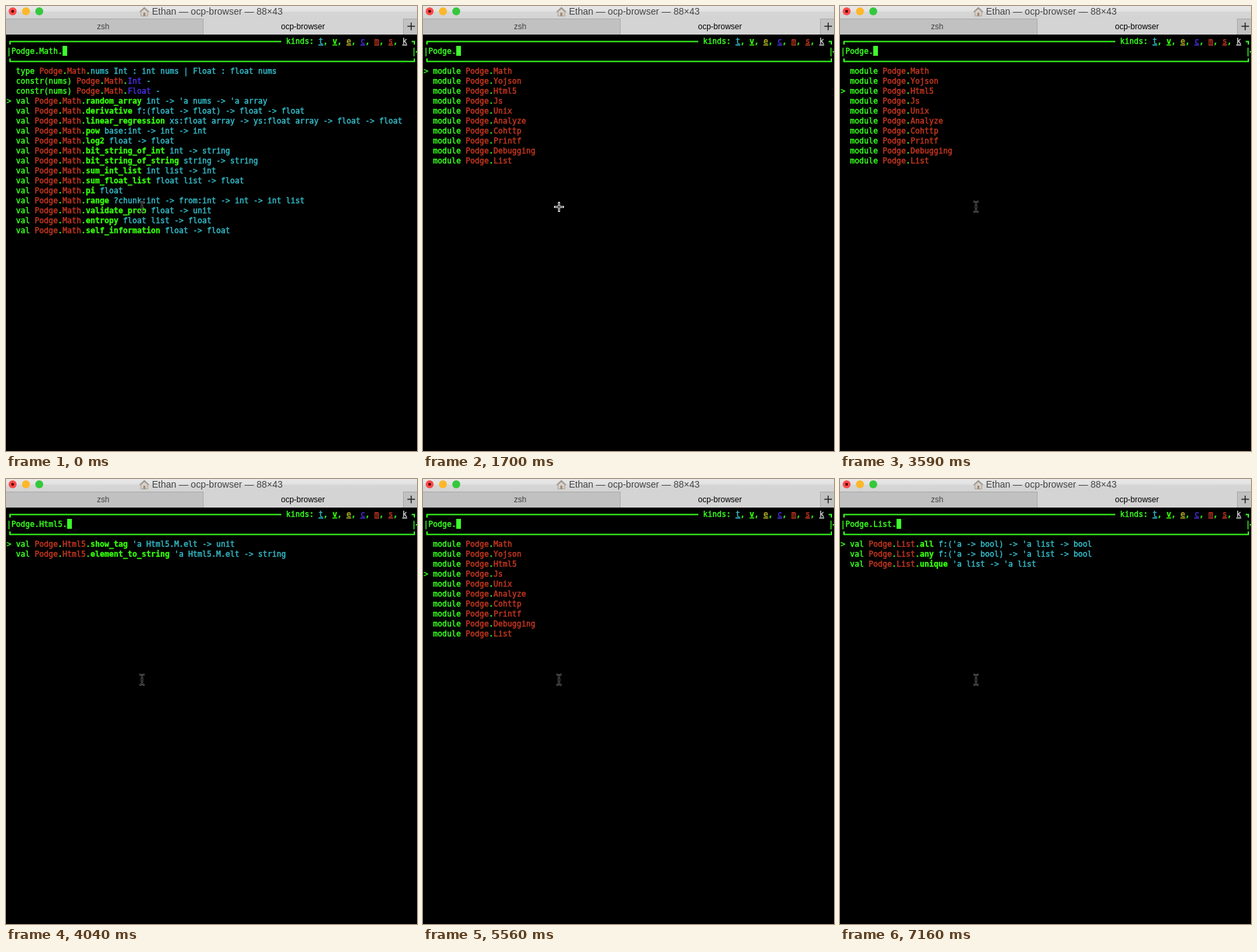
Write an HTML page that moves like this. It is 618 px wide and 670 px high and loops after 8000 ms.

```html
<!DOCTYPE html>
<html lang="en">
<head>
<meta charset="utf-8">
<title>ocp-browser</title>
<style>
  html, body { margin: 0; width: 100%; height: 100%; overflow: hidden; background: #000; }
  svg { display: block; }
  .ui { font-family: "Liberation Sans", Arial, sans-serif; fill: #444; }
  .term { font: 11.63px "DejaVu Sans Mono", monospace; }
  .term text, .term tspan { white-space: pre; }
  .term tspan { fill: currentColor; stroke: currentColor; stroke-width: .45px; }
  .term .b { font-weight: bold; stroke-width: .3px; }
  .g { color: #38fe1f; }
  .b { color: #36ff0c; }
  .r { color: #c4361f; }
  .t { color: #33bbc8; }
  .c { color: #4a30e1; }
  .e { color: #adad27; }
  .k { color: #cbcccd; }
  .u { text-decoration: underline; }
  .frame { fill: none; stroke: #38fe1f; stroke-width: 2; }
</style>
</head>
<body>
<svg width="618" height="670" viewBox="0 0 618 670">
  <defs>
    <linearGradient id="bar" x2="0" y2="1">
      <stop offset="0" stop-color="#e7e7e7"/>
      <stop offset=".4" stop-color="#e2e2e2"/>
      <stop offset=".45" stop-color="#d6d6d6"/>
      <stop offset="1" stop-color="#d3d3d3"/>
    </linearGradient>
    <path id="beamShape" d="M200.5 294.5Q204.5 294.5 204.5 298V306.5Q204.5 310 200.5 310M208.5 294.5Q204.5 294.5 204.5 298M204.5 306.5Q204.5 310 208.5 310M202.5 302.5H206.5"/>
  </defs>
  <rect width="618" height="670"/>

  <g class="ui">
    <rect width="618" height="20" fill="url(#bar)"/>
    <rect y="20" width="618" height="23" fill="#c1c1c1"/>
    <rect x="297" y="20" width="300" height="23" fill="#d4d4d4"/>
    <path d="M0 19.5H297M597 19.5H618M296.5 20V43M597.5 20V43" stroke="#a9a9a9"/>
    <circle cx="10" cy="8" r="6" fill="#fc4a48"/>
    <circle cx="10" cy="8" r="2.2" fill="#5c0805"/>
    <circle cx="30" cy="8" r="6" fill="#fdb72b"/>
    <circle cx="50" cy="8" r="6" fill="#35c83c"/>
    <path d="M203 8.5V15H213V8.5L208 4Z" fill="#d9d2c8" stroke="#a39b92"/>
    <path d="M201 9L208 2.5L215 9" fill="none" stroke="#99918a" stroke-width="1.6"/>
    <rect x="206.5" y="10" width="3" height="5" fill="#9a8672"/>
    <text x="219.5" y="13" font-size="14">Ethan — ocp-browser — 88×43</text>
    <text x="146" y="35" font-size="12" text-anchor="middle">zsh</text>
    <text x="446.5" y="35" font-size="12" text-anchor="middle" fill="#000">ocp-browser</text>
    <path d="M603.5 30.5H615M609.3 25V36.5" stroke="#222" stroke-width="1.5"/>
  </g>

  <path class="frame" d="M414 53.5H6V58M610 53.5H614V58M6 79V83.5H614V79M616 69H618"/>
  <g class="term" id="term"></g>
  <rect id="caret" y="60" width="7" height="15" fill="#3cff2a"/>

  <g id="beam" fill="none">
    <use href="#beamShape" stroke="#747474" stroke-width="2.6"/>
    <use href="#beamShape" stroke="#000"/>
  </g>
  <g id="cross">
    <path d="M197 302.5H212M204.5 295V310" stroke="#fff" stroke-width="3"/>
    <path d="M198 302.5H211M204.5 296V309" stroke="#000"/>
  </g>
</svg>
<script>
const LOOP = 8000;
const $ = id => document.getElementById(id);
const term = $('term');

function make(tag, parent, attrs, text = '') {
  const node = document.createElementNS('http://www.w3.org/2000/svg', tag);
  for (const key in attrs) node.setAttribute(key, attrs[key]);
  node.textContent = text;
  parent.append(node);
  return node;
}

const colX = col => 1 + 7 * col;
const baseline = row => 57 + 15 * row;

// runs: [class, text] pairs laid out one after another
function line(parent, row, col, runs) {
  const text = make('text', parent, { x: colX(col), y: baseline(row) });
  for (const [cls, str] of runs) make('tspan', text, { class: cls }, str);
  return text;
}

const path = name => [['r', 'Podge'], ['g', '.'], ['r', name]];
const entry = (kind, mod, cls, name, type) =>
  [['g', kind + ' '], ...path(mod), ['g', '.'], [cls, name], ['t', ' ' + type]];
const vals = (mod, list) => list.map(item => {
  const [name, ...type] = item.split(' ');
  return entry('val', mod, 'b', name, type.join(' '));
});

const modules = 'Math Yojson Html5 Js Unix Analyze Cohttp Printf Debugging List'.split(' ');
const views = {
  '': modules.map(name => [['g', 'module '], ...path(name)]),
  Math: [
    entry('type', 'Math', 't', 'nums', 'Int : int nums | Float : float nums'),
    entry('constr(nums)', 'Math', 'c', 'Int', '-'),
    entry('constr(nums)', 'Math', 'c', 'Float', '-'),
    ...vals('Math', [
      "random_array int -> 'a nums -> 'a array",
      'derivative f:(float -> float) -> float -> float',
      'linear_regression xs:float array -> ys:float array -> float -> float',
      'pow base:int -> int -> int',
      'log2 float -> float',
      'bit_string_of_int int -> string',
      'bit_string_of_string string -> string',
      'sum_int_list int list -> int',
      'sum_float_list float list -> float',
      'pi float',
      'range ?chunk:int -> from:int -> int -> int list',
      'validate_prob float -> unit',
      'entropy float list -> float',
      'self_information float -> float'
    ])
  ],
  Yojson: vals('Yojson', ['show_pretty string -> unit']),
  Html5: vals('Html5', [
    "show_tag 'a Html5.M.elt -> unit",
    "element_to_string 'a Html5.M.elt -> string"
  ]),
  List: vals('List', [
    "all f:('a -> bool) -> 'a list -> bool",
    "any f:('a -> bool) -> 'a list -> bool",
    "unique 'a list -> 'a list"
  ])
};

// Each step changes only the listed parts of the state.
const steps = [
  [0, { view: 'Math', sel: 3, caret: true, cross: false }],
  [90, { sel: 2 }],
  [180, { sel: 1 }],
  [360, { sel: 0 }],
  [900, { sel: 1 }],
  [990, { sel: 2 }],
  [1530, { caret: false }],
  [1620, { cross: true }],
  [1700, { view: '', sel: 0, caret: true }],
  [1880, { cross: false }],
  [2240, { sel: 1 }],
  [2510, { view: 'Yojson', sel: 0 }],
  [3140, { cross: true }],
  [3320, { view: '', sel: 1, cross: false }],
  [3590, { sel: 2 }],
  [4040, { view: 'Html5', sel: 0 }],
  [4670, { caret: false }],
  [4850, { cross: true }],
  [5020, { view: '', sel: 2, caret: true }],
  [5200, { cross: false }],
  [5560, { sel: 3 }],
  [5640, { sel: 4 }],
  [5820, { sel: 5 }],
  [6000, { sel: 6 }],
  [6080, { sel: 7 }],
  [6260, { sel: 8 }],
  [6890, { sel: 9 }],
  [7160, { view: 'List', sel: 0 }]
];

const kinds = [['t', 't'], ['b', 'v'], ['e', 'e'], ['c', 'c'], ['r', 'm'], ['r', 's'], ['k', 'k']];
line(term, 0, 60, [['g', 'kinds: '], ...kinds.flatMap(([cls, key], i) =>
  i ? [['g', ', '], [cls + ' u', key]] : [[cls + ' u', key]])]);
line(term, 1, 0, [['g', '|']]);
line(term, 1, 87, [['g', '|']]);
const query = line(term, 1, 1, [['g', '']]).firstElementChild;
const marker = line(term, 3, 0, [['g', '>']]);

const groups = {};
for (const name in views) {
  groups[name] = make('g', term, {});
  views[name].forEach((runs, i) => line(groups[name], 3 + i, 2, runs));
}

const show = (node, on) => node.setAttribute('visibility', on ? 'visible' : 'hidden');

function render(time) {
  const state = {};
  for (const [at, change] of steps) if (at <= time) Object.assign(state, change);
  const typed = 'Podge.' + (state.view && state.view + '.');
  for (const name in groups) show(groups[name], name === state.view);
  query.textContent = typed;
  marker.setAttribute('y', baseline(3 + state.sel));
  $('caret').setAttribute('x', colX(1 + typed.length));
  show($('caret'), state.caret);
  show($('cross'), state.cross);
  show($('beam'), !state.cross);
}

const start = performance.now();
function tick() {
  render((performance.now() - start) % LOOP);
  requestAnimationFrame(tick);
}
tick();
</script>
</body>
</html>
```
